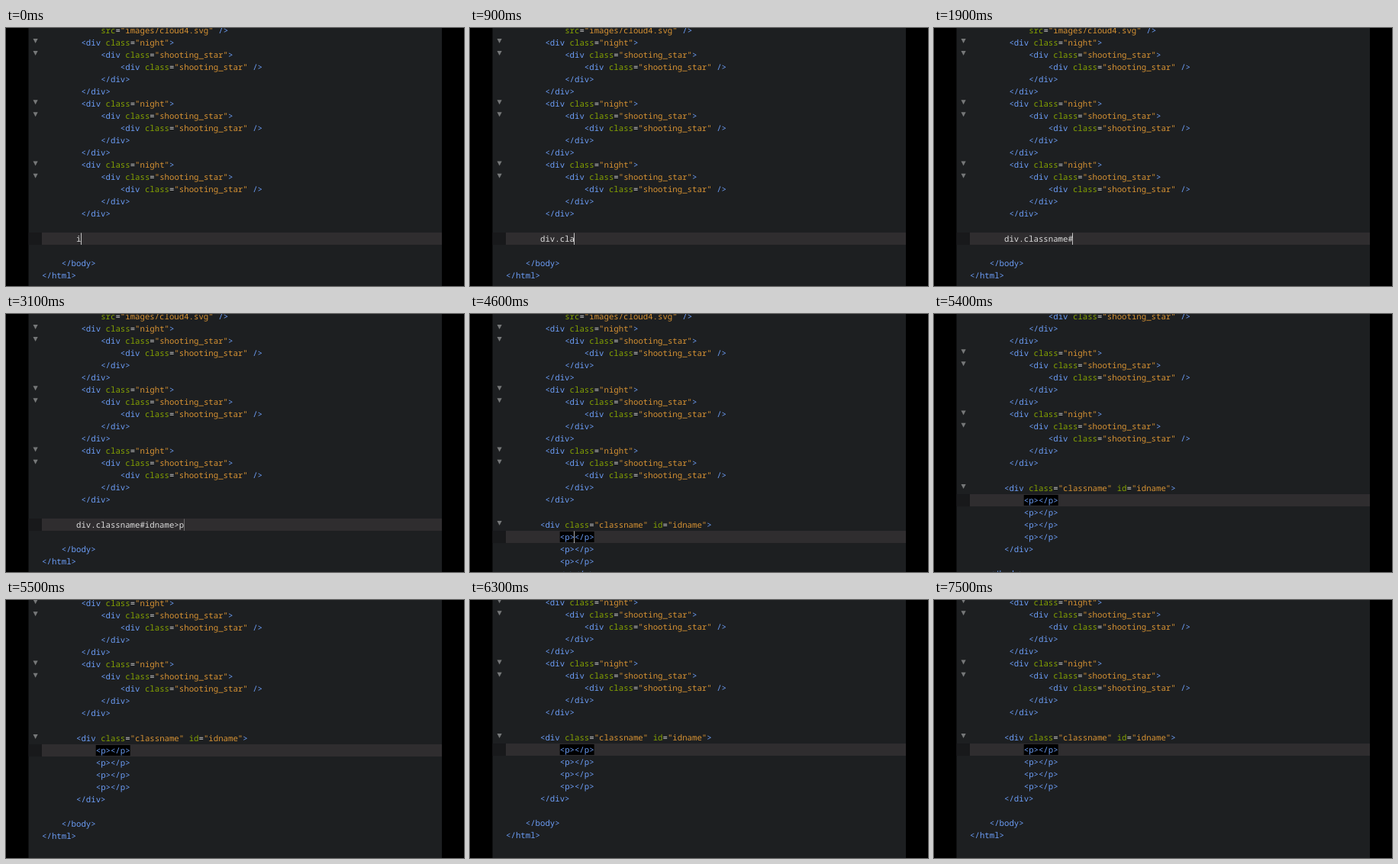
Animation, 600 px wide and 338 px high, one loop 7600 ms. Source, as an HTML page with a canvas:

```html
<!DOCTYPE html>
<html lang="en">
<head>
<meta charset="utf-8">
<title>Abbreviation expanding in a code editor</title>
<style>
  html, body { margin: 0; height: 100%; overflow: hidden; background: #000; }
  canvas { display: block; }
</style>
</head>
<body>
<canvas id="stage" width="600" height="338"></canvas>
<script>
const ctx = document.getElementById('stage').getContext('2d');
const LOOP = 7600, STEP = 100;
const LEFT = 47.1, COL = 6.42, ROW = 16.06, FIRST_ROW = 19;
const EDIT_ROW = 16, EDIT_COL = 7, EXPAND_AT = 4600;
const COLORS = { tag: '#6c9ef8', attr: '#85a300', string: '#d89333', plain: '#ddd' };

// Each line is [column, text, foldable]
const night = [
  [8, '<div class="night">', true],
  [12, '<div class="shooting_star">', true],
  [16, '<div class="shooting_star" />'],
  [12, '</div>'],
  [8, '</div>']
];
const above = [[12, 'src="images/cloud4.svg" />'], ...night, ...night, ...night, [0, '']];
const below = [[0, ''], [4, '</body>'], [0, '</html>']];
const paragraph = [11, '<p></p>'];
const expanded = [
  [EDIT_COL, '<div class="classname" id="idname">', true],
  paragraph, paragraph, paragraph, paragraph,
  [EDIT_COL, '</div>']
];

// Bursts of typing, one key per step
const bursts = [
  [200, 'div.'], [700, 'classname'], [1900, '#idn'], [2500, 'ame'],
  [2900, '>p'], [3600, '*'], [4200, '4']
];

function typedAt(t) {
  if (t < 100) return { text: 'i', lastKey: 0 };
  let text = '', lastKey = 100;
  for (const [start, keys] of bursts) {
    if (t < start) break;
    const count = Math.min(keys.length, Math.floor((t - start) / STEP) + 1);
    text += keys.slice(0, count);
    lastKey = start + (count - 1) * STEP;
  }
  return { text, lastKey };
}

const colX = col => LEFT + col * COL;
const rowY = row => FIRST_ROW + row * ROW;

function drawText(col, row, text, color) {
  ctx.fillStyle = color;
  ctx.fillText(text, colX(col), rowY(row) + 3.6);
}

function drawMarkup(col, row, text) {
  const tokens = /(?<string>"[^"]*")|(?<attr>\w+)(?==)|(?<plain>=)|(?<tag>[^\s="]+)/g;
  for (const m of text.matchAll(tokens)) {
    const kind = Object.keys(m.groups).find(k => m.groups[k]);
    drawText(col + m.index, row, m[0], COLORS[kind]);
  }
}

function drawFold(row) {
  const y = rowY(row) - 5;
  ctx.fillStyle = '#767879';
  ctx.beginPath();
  ctx.moveTo(35.5, y);
  ctx.lineTo(41.7, y);
  ctx.lineTo(38.6, y + 6);
  ctx.fill();
}

function drawCursor(col, row, alpha) {
  ctx.fillStyle = `rgba(221,221,221,${alpha})`;
  ctx.fillRect(Math.floor(colX(col)), rowY(row) - 7.5, 1, 15.5);
}

function draw(now) {
  const t = Math.floor(now % LOOP / STEP) * STEP;
  const isExpanded = t >= EXPAND_AT;
  const activeRow = EDIT_ROW + (isExpanded ? 1 : 0);
  const scroll = 96 / (1 + Math.exp((5400 - t) / 22));

  ctx.fillStyle = '#000';
  ctx.fillRect(0, 0, 600, 338);
  ctx.fillStyle = '#1d1f21';
  ctx.fillRect(29.5, 0, 541.5, 338);

  ctx.save();
  ctx.translate(0, -scroll);
  ctx.font = '10.7px "Noto Sans Mono", monospace';
  ctx.textRendering = 'geometricPrecision';

  ctx.fillStyle = '#18191b';
  ctx.fillRect(29.5, rowY(activeRow) - 8, 17.5, 16);
  ctx.fillStyle = '#2f2d2f';
  ctx.fillRect(47, rowY(activeRow) - 8, 524, 16);
  if (isExpanded) {
    ctx.fillStyle = '#000';
    ctx.fillRect(colX(11), rowY(activeRow) - 7, 7 * COL, 14);
  }

  const lines = [...above, ...(isExpanded ? expanded : [[EDIT_COL, '']]), ...below];
  lines.forEach(([col, text, foldable], i) => {
    drawMarkup(col, i - 1, text);
    if (foldable) drawFold(i - 1);
  });

  if (isExpanded) {
    drawCursor(14, activeRow, Math.max(0, 0.8 - (t - EXPAND_AT) / 200));
  } else {
    const { text, lastKey } = typedAt(t);
    drawText(EDIT_COL, EDIT_ROW, text, COLORS.plain);
    const resting = t > 2900 && t > lastKey;
    drawCursor(EDIT_COL + text.length, EDIT_ROW, resting ? 0.35 : 0.85);
  }
  ctx.restore();
}

const startTime = performance.now();
function tick() {
  draw(performance.now() - startTime);
  requestAnimationFrame(tick);
}
tick();
</script>
</body>
</html>
```
